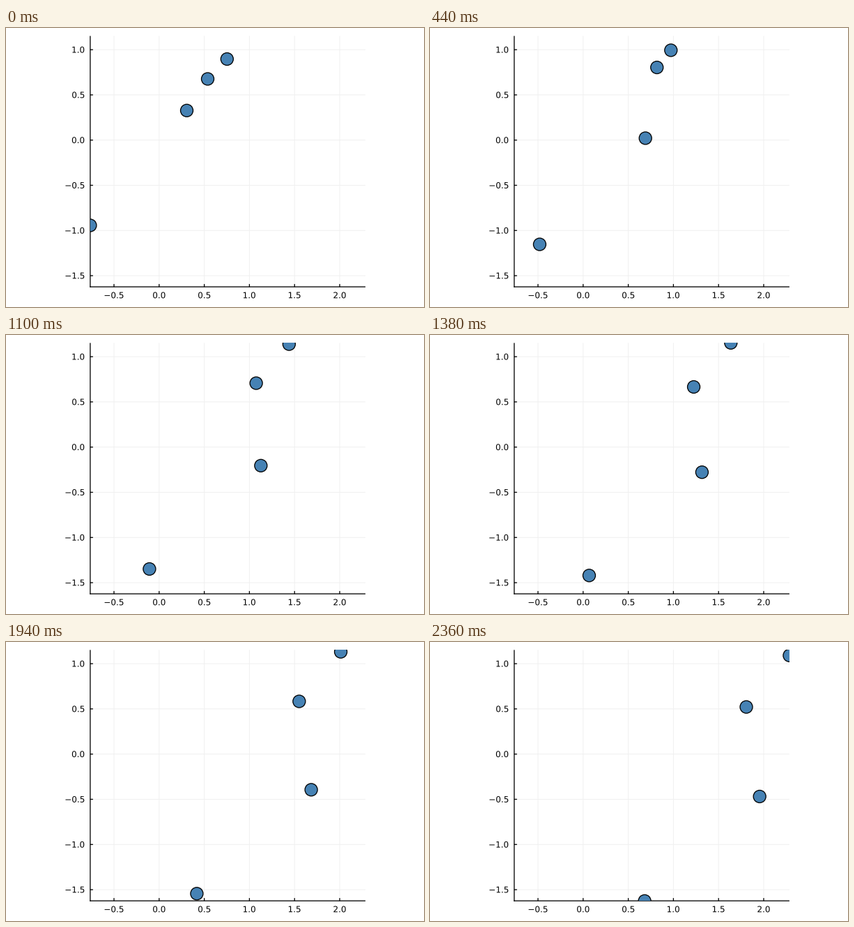
A matplotlib script for the animation above (2.46 s loop, 600 by 400 pixels).

```python
import numpy as np
import matplotlib.pyplot as plt
from matplotlib.animation import FuncAnimation
from matplotlib.patches import Circle, PathPatch, Rectangle
from matplotlib.textpath import TextPath
from matplotlib.transforms import Affine2D

W, H, DPI = 600, 400, 100
PX = 72 / DPI                                   # one pixel in points
LEFT, RIGHT, TOP, BOTTOM = 120.9, 515.9, 11.4, 371.1
X0, Y0, UNIT = 219.8, 160.7, 129.6              # data origin and scale
STEPS, TICK = 51, 20

plt.rcParams["font.family"] = "DejaVu Sans"
fig = plt.figure(figsize=(W / DPI, H / DPI), dpi=DPI, facecolor="white")
ax = fig.add_axes([0, 0, 1, 1])
ax.set_xlim(0, W)
ax.set_ylim(H, 0)
ax.axis("off")


def line(xs, ys, color="black", width=1.3, z=2):
    ax.plot(xs, ys, color=color, lw=width * PX, zorder=z,
            solid_capstyle="butt", snap=False)


def label(x, y, value, align):
    """Draw a number as outlines, vertically centred on y."""
    path = TextPath((0, 0), f"{value:.1f}".replace("-", "\u2212"), size=12)
    box = path.get_extents()
    anchor = box.x1 if align == "right" else (box.x0 + box.x1) / 2
    place = Affine2D().translate(-anchor, -(box.y0 + box.y1) / 2)
    place.scale(1, -1).translate(x, y)
    ax.add_patch(PathPatch(place.transform_path(path), fc="black", lw=0,
                           snap=False))


def draw_axes():
    for v in np.arange(-0.5, 2.1, 0.5):
        x = X0 + UNIT * v
        line([x, x], [TOP, BOTTOM], "#f0f0f0", 1, 1)
        line([x, x], [BOTTOM, BOTTOM - 4])
        label(x, 383, v, "center")
    for v in np.arange(-1.5, 1.1, 0.5):
        y = Y0 - UNIT * v
        line([LEFT, RIGHT], [y, y], "#f0f0f0", 1, 1)
        line([LEFT, LEFT + 4], [y, y])
        label(112.3, y, v, "right")
    line([LEFT, LEFT], [TOP, BOTTOM + 0.6])
    line([LEFT - 0.6, RIGHT], [BOTTOM, BOTTOM])


# The flock drifts as one while relative speeds die out: slowly between
# the lone body and the other three, faster among those three.
DRIFT = np.array([3.823, 0.932])
SLOW_RATE = 0.05
LONE_SHIFT = np.array([-4.3, 45.4])


class Body:
    def __init__(self, start, shift=(0, 0), rate=0.069, lone=False):
        self.start = np.array(start)
        self.shift = np.array(shift)
        self.rate = rate
        self.slow = LONE_SHIFT if lone else -LONE_SHIFT / 3

    def at(self, t):
        return (self.start + DRIFT * t
                + self.slow * (1 - np.exp(-SLOW_RATE * t))
                + self.shift * (1 - np.exp(-self.rate * t)))


bodies = [
    Body((120.9, 283), lone=True),
    Body((259.5, 118.3), (21.9, 72.8)),
    Body((289.5, 73), (35.1, -89.2)),
    Body((317.3, 44.5), (-57, 16.3), rate=0.076),
]

draw_axes()
window = Rectangle((LEFT, TOP), RIGHT - LEFT, BOTTOM - TOP,
                   transform=ax.transData)
balls = []
for i in range(len(bodies)):
    ball = Circle((0, 0), 9, fc="#4682b4", ec="black", lw=1.3 * PX,
                  zorder=3 + i)
    ax.add_patch(ball)
    ball.set_clip_path(window)
    balls.append(ball)

# Uneven rhythm: short, long, short; the last pose is held.
holds = np.where(np.arange(STEPS) % 3 == 1, 5, 1)
holds[-1] = 5
schedule = np.repeat(np.arange(STEPS), holds)


def update(frame):
    for ball, body in zip(balls, bodies):
        ball.center = tuple(body.at(schedule[frame]))
    return balls


anim = FuncAnimation(fig, update, frames=len(schedule), interval=TICK,
                     repeat=True, repeat_delay=0, blit=False)
plt.show()
```
